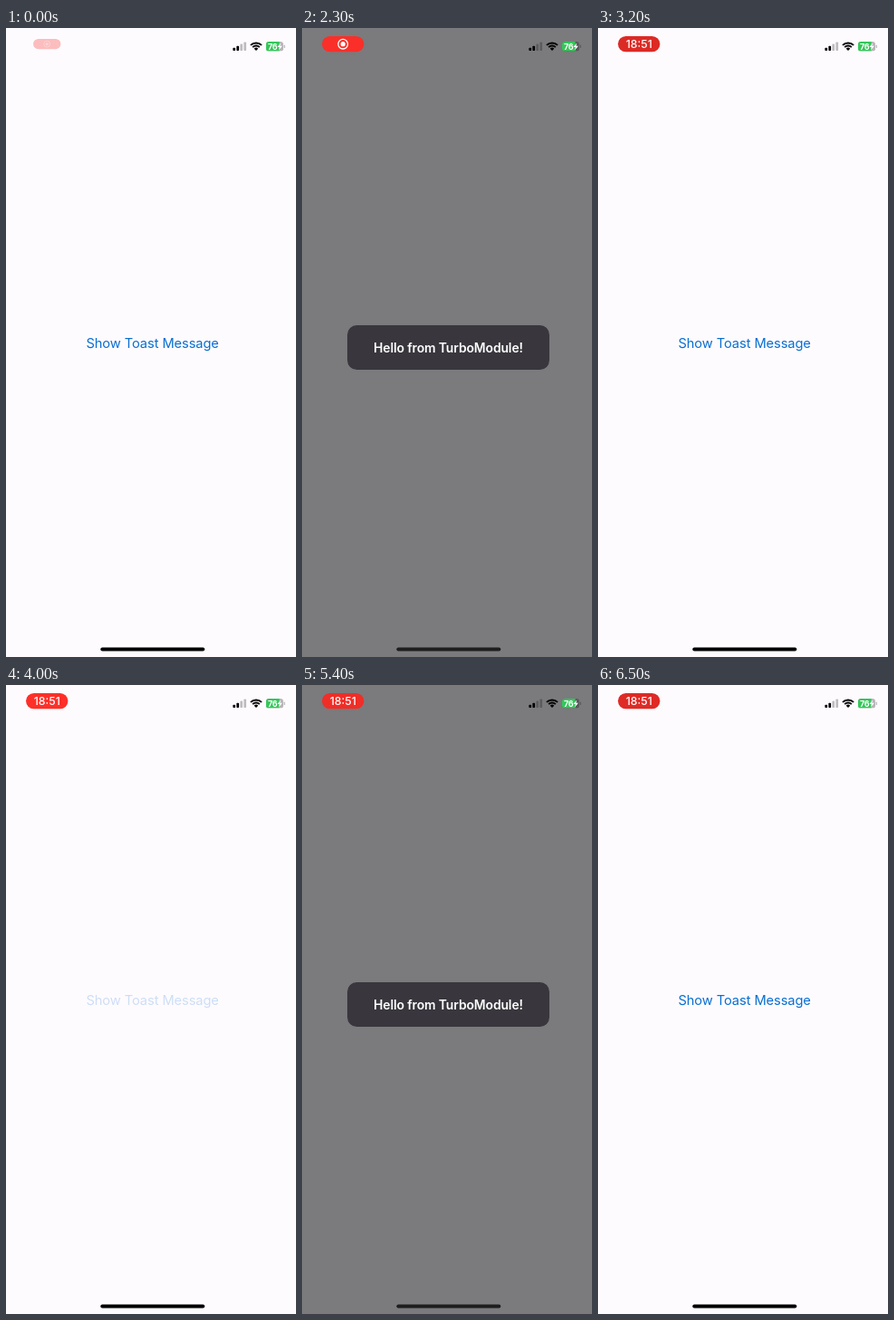
Animation of 320x692 px, one loop 6.6 s. Source, as an HTML page with a canvas:

```html
<!DOCTYPE html>
<html lang="en">
<head>
<meta charset="utf-8">
<title>Toast message</title>
<style>
  html, body { margin: 0; width: 100%; height: 100%; overflow: hidden; background: #fefbff; }
  canvas { display: block; width: 320px; height: 692px; }
</style>
</head>
<body>
<canvas id="stage"></canvas>
<script>
const W = 320, H = 692, LOOP = 6600, STEP = 100;
const REPEAT = 3300; // second tap follows the first by this much
const FONT = 'Inter, "Liberation Sans", sans-serif';
const canvas = document.getElementById('stage');
const ctx = canvas.getContext('2d');
const ratio = window.devicePixelRatio || 1;
canvas.width = W * ratio;
canvas.height = H * ratio;

const clamp = x => Math.min(1, Math.max(0, x));
const ramp = (t, from, to) => clamp((t - from) / (to - from));
const mix = (a, b, p) => a + (b - a) * p;
const easeOut = p => 1 - Math.pow(1 - p, 2.4);

function box(x, y, w, h, r, fill) {
  ctx.beginPath();
  ctx.roundRect(x, y, w, h, r);
  ctx.fillStyle = fill;
  ctx.fill();
}

function label(text, x, y, size, weight, fill, spacing = 0) {
  ctx.font = `${weight} ${size}px ${FONT}`;
  ctx.letterSpacing = spacing + 'px';
  ctx.textAlign = 'center';
  ctx.textBaseline = 'alphabetic';
  ctx.fillStyle = fill;
  ctx.fillText(text, x + spacing / 2, y);
}

// Draws with its own opacity and scale around a point
function group(alpha, scale, cx, cy, draw) {
  if (alpha <= 0) return;
  ctx.save();
  ctx.globalAlpha *= alpha;
  ctx.translate(cx, cy);
  ctx.scale(scale, scale);
  draw();
  ctx.restore();
}

function drawButton(t, leaving) {
  const press = ramp(t, 550, 700), release = ramp(t, 800, 1050);
  const alpha = 1 - 0.8 * press * (1 - release);
  const dimmed = t >= 850 && !leaving;
  group(alpha, 1, 161.7, 351.7, () =>
    label('Show Toast Message', 0, 0, 14.7, 400, dimmed ? '#74757c' : '#0a6fd0', -0.1));
}

function drawToast(shown, scale) {
  group(shown, scale, 161.5, 351.5, () => {
    box(-111.5, -24.5, 223, 49, 10.5, '#39373d');
    label('Hello from TurboModule!', 0, 5, 13.9, 600, '#fff', -0.1);
  });
}

function drawPill(t) {
  const grow = ramp(t, -100, 200);
  const scale = t < 300 ? mix(0.45, 1.06, grow) : 1;
  const glow = 0.5 + 0.5 * Math.cos((t - 3950) / 1850 * Math.PI * 2);
  const red = `rgb(${mix(217, 254, glow)}, ${mix(42, 48, glow)}, ${mix(37, 41, glow)})`;
  const clock = ramp(t, 2850, 3150);
  group(clamp(0.3 + t / 280), scale, 45.2, 17.6, () => {
    box(-23.2, -8.7, 46.4, 17.4, 8.7, red);
    group(1 - clock, 1, 0, 0.1, () => {
      ctx.strokeStyle = ctx.fillStyle = '#fff';
      ctx.lineWidth = 1.3;
      ctx.beginPath();
      ctx.arc(0, 0, 5.3, 0, Math.PI * 2);
      ctx.stroke();
      ctx.beginPath();
      ctx.arc(0, 0, 2.6, 0, Math.PI * 2);
      ctx.fill();
    });
    group(clock, 1, 0, 4.4, () => label('18:51', 0, 0, 12.3, 500, '#fff'));
  });
}

function drawSignal() {
  for (let i = 0; i < 4; i++) {
    const h = 3.2 + i * 2.1;
    box(250.4 + i * 4, 25 - h, 2.7, h, 0.8, i < 2 ? '#000' : 'rgba(0,0,0,.25)');
  }
}

function drawWifi() {
  const cx = 276, cy = 25, half = 0.78, up = -Math.PI / 2;
  [[0, 3.2], [4.4, 6.4], [7.6, 9.6]].forEach(([inner, outer]) => {
    ctx.beginPath();
    ctx.arc(cx, cy, outer, up - half, up + half);
    ctx.arc(cx, cy, inner, up + half, up - half, true);
    ctx.closePath();
    ctx.fillStyle = '#000';
    ctx.fill();
  });
}

function drawBattery() {
  ctx.save();
  ctx.beginPath();
  ctx.roundRect(287, 15, 19, 10.6, 3.2);
  ctx.clip();
  box(287, 15, 19, 10.6, 0, 'rgba(0,0,0,.28)');
  box(287, 15, 14.6, 10.6, 0, '#35c759');
  ctx.restore();
  box(306.7, 18.6, 1.2, 3.4, 0.6, 'rgba(0,0,0,.28)');
  label('76', 294.3, 23.6, 9, 700, '#fff', -0.2);
  ctx.beginPath();
  [[303.2, 16.6], [299.4, 21], [301.8, 21], [300.9, 24.4], [304.9, 19.7], [302.4, 19.7]]
    .forEach(([x, y]) => ctx.lineTo(x, y));
  ctx.closePath();
  ctx.fillStyle = '#fff';
  ctx.fill();
}

function draw(t) {
  const tap = t < REPEAT ? t : t - REPEAT;
  const enter = easeOut(ramp(tap, 800, 1200));
  const leave = easeOut(ramp(tap, 2900, 3200));
  const fade = tap > 2900 ? clamp(1 - ramp(tap, 2900, 3100)) : enter;
  const shown = tap > 2900 ? mix(fade, 1 - leave, 0.15) : enter;

  ctx.setTransform(ratio, 0, 0, ratio, 0, 0);
  box(0, 0, W, H, 0, '#fefbff');
  drawButton(tap, tap >= 2900);
  box(0, 0, W, H, 0, `rgba(0,0,0,${0.515 * shown})`);
  drawToast(shown, tap < 2900 ? mix(1.2, 1, enter) : 1);

  drawPill(t);
  drawSignal();
  drawWifi();
  drawBattery();
  const bar = 30 * clamp(shown * 2 - 1);
  box(104.3, 681.6, 115, 4, 2, `rgb(${bar}, ${bar}, ${bar})`);
}

const start = performance.now();
function frame() {
  const t = (performance.now() - start) % LOOP;
  draw(Math.floor(t / STEP) * STEP);
  requestAnimationFrame(frame);
}
frame();
</script>
</body>
</html>
```
